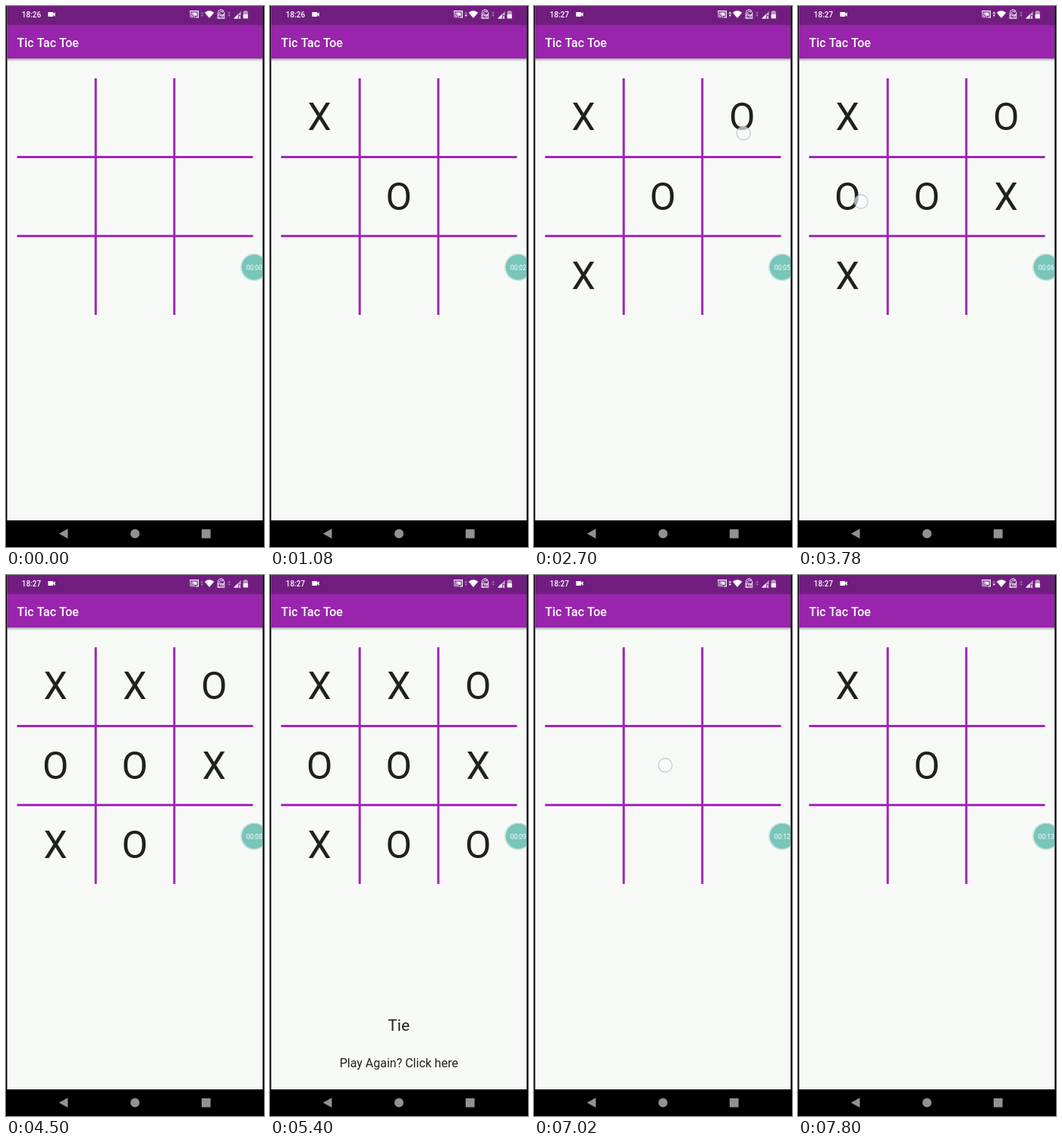
Animation of 340 by 711 pixels, one loop 8000 ms. Source, as an HTML page with a canvas:

```html
<!DOCTYPE html>
<html lang="en">
<head>
<meta charset="utf-8">
<title>Tic Tac Toe</title>
<style>
html, body { margin: 0; width: 100%; height: 100%; overflow: hidden; background: #000; }
canvas { display: block; width: 340px; height: 711px; }
</style>
</head>
<body>
<canvas id="stage"></canvas>
<script>
const W = 340, H = 711, LOOP = 8000;
const canvas = document.getElementById('stage');
const ctx = canvas.getContext('2d');
const ratio = window.devicePixelRatio || 1;
canvas.width = W * ratio;
canvas.height = H * ratio;

// Marks by time; cells run row by row
const moves = [
  { t: 120, O: 4, X: 0 }, { t: 2700, O: 2, X: 6 }, { t: 3780, O: 3, X: 5 },
  { t: 4380, O: 7, X: 1 }, { t: 5160, O: 8 },
  { t: 6120, clear: true }, { t: 7080, O: 4, X: 0 }
];
const taps = [
  [60, 240, 173, 250], [2640, 2820, 276, 167], [3660, 3840, 83, 257],
  [4260, 4440, 172, 356], [5040, 5220, 276, 356],
  [6000, 6180, 172, 643], [6960, 7140, 173, 250]
];
// Data arrows: bit 1 is up, bit 2 is down
const traffic = [[0, 0], [840, 2], [1800, 0], [2400, 3], [4200, 0], [6600, 2], [6840, 3], [7800, 2]];

function rect(x, y, w, h, color) {
  ctx.fillStyle = color;
  ctx.fillRect(x, y, w, h);
}

function disc(x, y, r, color) {
  ctx.fillStyle = color;
  ctx.beginPath();
  ctx.arc(x, y, r, 0, Math.PI * 2);
  ctx.fill();
}

function poly(points, color) {
  ctx.fillStyle = color;
  ctx.beginPath();
  points.forEach(([x, y]) => ctx.lineTo(x, y));
  ctx.fill();
}

function arc(x, y, r, from, to, color, width) {
  ctx.strokeStyle = color;
  ctx.lineWidth = width;
  ctx.beginPath();
  ctx.arc(x, y, r, from * Math.PI, to * Math.PI);
  ctx.stroke();
}

function text(str, x, y, size, color, weight = 400, align = 'left') {
  ctx.font = `${weight} ${size}px Roboto, sans-serif`;
  ctx.textAlign = align;
  ctx.fillStyle = color;
  ctx.fillText(str, x, y);
}

function arrows(x, lit) {
  const tone = on => on ? '#fff' : '#a577ae';
  poly([[x - 1.8, 10], [x, 7.6], [x + 1.8, 10]], tone(lit & 1));
  poly([[x - 1.8, 11.6], [x, 14], [x + 1.8, 11.6]], tone(lit & 2));
}

function statusBar(t) {
  const white = '#fff';
  rect(1.5, 0, 337, 25, '#711d80');
  text(t < 2400 ? '18:26' : '18:27', 20.7, 14.6, 10, white, 500);
  rect(55.5, 8, 6.8, 6, white);
  poly([[62, 10.5], [64.8, 8.2], [64.8, 13.8], [62, 11.5]], white);

  ctx.strokeStyle = white;
  ctx.lineWidth = 1.2;
  ctx.beginPath();
  ctx.moveTo(242.8, 8.5);
  ctx.lineTo(242.8, 6.6);
  ctx.lineTo(253.4, 6.6);
  ctx.lineTo(253.4, 14.8);
  ctx.lineTo(249.8, 14.8);
  ctx.stroke();
  poly([[244.8, 8.5], [251.5, 8.5], [251.5, 13], [249, 13]], white);
  [2, 4, 6].forEach(r => arc(242.2, 15.4, r, 1.5, 2, white, 1));

  arrows(258.3, traffic.filter(([at]) => at <= t).pop()[1]);
  ctx.fillStyle = white;
  ctx.beginPath();
  ctx.moveTo(268, 16);
  ctx.lineTo(261.8, 8.7);
  ctx.quadraticCurveTo(268, 3.8, 274.2, 8.7);
  ctx.fill();

  arc(283.5, 9, 4.2, 0.85, 1.8, white, 1);
  arc(283.5, 9, 2, 0.8, 1.9, white, 1);
  ctx.strokeStyle = white;
  ctx.lineWidth = 0.9;
  ctx.strokeRect(279, 11.2, 8.8, 5);
  text('LTE', 283.4, 15.5, 4.6, white, 700, 'center');
  arc(285.5, 9.4, 2.4, 1.4, 2.3, white, 1);
  arrows(294, 0);

  poly([[300, 16.4], [309.6, 7], [309.6, 16.4]], '#c5a2cb');
  poly([[300, 16.4], [305.5, 11], [305.5, 16.4]], white);
  rect(306, 12.3, 4.5, 4.7, '#711d80');
  text('x', 306.2, 16.5, 6.5, white, 700);
  rect(314.2, 6, 3, 1.5, '#b994c0');
  rect(312.6, 7, 6.2, 4.5, '#b994c0');
  rect(312.6, 11, 6.2, 5.4, white);
}

function appBar() {
  const shade = ctx.createLinearGradient(0, 69, 0, 73);
  shade.addColorStop(0, 'rgba(60,40,65,.38)');
  shade.addColorStop(1, 'rgba(60,40,65,0)');
  rect(1.5, 69, 337, 4, shade);
  rect(1.5, 25, 337, 44, '#9925ac');
  text('Tic Tac Toe', 14.5, 53.6, 16, '#fff', 500);
}

function board(t) {
  const line = '#a026b5', ink = '#1f211f';
  [118.2, 221.8].forEach(x => rect(x - 1.5, 95, 3, 311, line));
  [198.5, 302.3].forEach(y => rect(14.5, y - 1.5, 311, 3, line));

  let cells = [];
  for (const m of moves.filter(m => m.t <= t)) {
    if (m.clear) cells = [];
    else {
      cells[m.O] = 'O';
      if ('X' in m) cells[m.X] = 'X';
    }
  }
  cells.forEach((mark, i) => {
    text(mark, 65.2 + (i % 3) * 104.5, 163 + Math.floor(i / 3) * 104.5, 50, ink, 400, 'center');
  });
  if (cells.filter(Boolean).length === 9) {
    text('Tie', 169.7, 599, 21, ink, 400, 'center');
    text('Play Again? Click here', 169.8, 647.4, 16, ink, 400, 'center');
  }
}

function bubble(t) {
  const sec = Math.floor((t + 360) / 600);
  disc(327, 343.3, 17.8, '#b9ddd7');
  disc(327, 343.3, 16.2, '#78c5ba');
  text('00:' + String(sec).padStart(2, '0'), 316.8, 346.5, 8.4, '#fff');
}

function tap(t) {
  const hit = taps.find(([from, to]) => t >= from && t < to);
  if (!hit) return;
  const [, , x, y] = hit;
  disc(x, y, 9, 'rgba(250,251,253,.65)');
  arc(x, y, 9, 0, 2, 'rgba(150,155,165,.5)', 1.3);
}

function navBar() {
  const grey = '#929292';
  rect(0, 676, W, 35, '#000');
  poly([[69.8, 693.5], [81.5, 687], [81.5, 700]], grey);
  disc(170, 693.5, 6, grey);
  rect(257.8, 687.7, 11.8, 11.8, grey);
}

function draw(t) {
  ctx.setTransform(ratio, 0, 0, ratio, 0, 0);
  rect(0, 0, W, H, '#000');
  rect(1.5, 0, 337, 676, '#f7f9f7');
  statusBar(t);
  appBar();
  board(t);
  bubble(t);
  tap(t);
  rect(338.5, 0, 1.5, H, '#000');
  navBar();
}

const start = performance.now();
function tick() {
  draw((performance.now() - start) % LOOP);
  requestAnimationFrame(tick);
}
tick();
</script>
</body>
</html>
```
